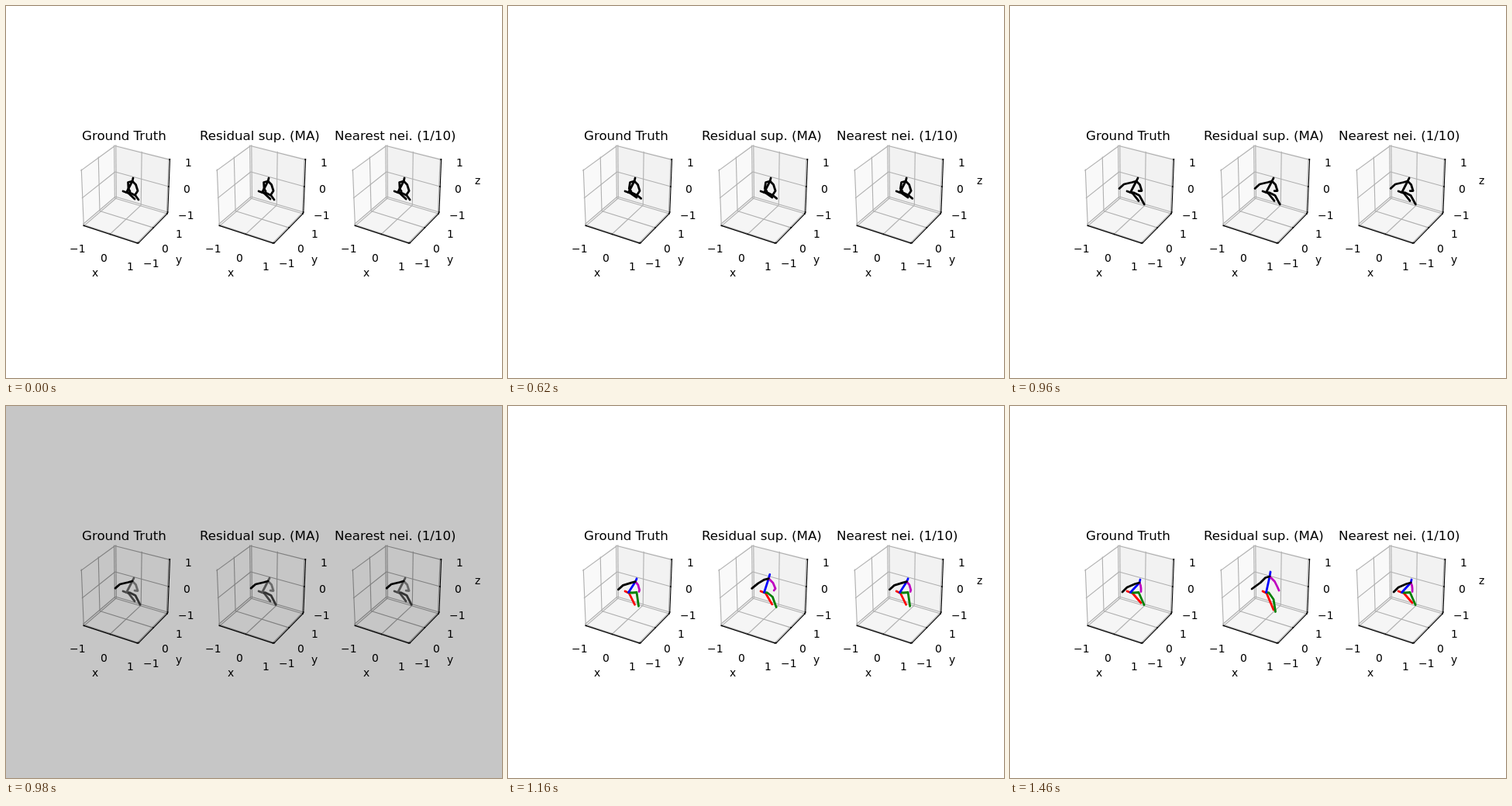
Recreate the animation shown at these times as an HTML page with a canvas. Size 640x480 px, loop 1480 ms.

```html
<!DOCTYPE html>
<html lang="en">
<head>
<meta charset="utf-8">
<title>Pose comparison</title>
<style>
  html, body { margin: 0; width: 100%; height: 100%; overflow: hidden; background: #fff; }
  canvas { display: block; }
</style>
</head>
<body>
<canvas id="stage" width="640" height="480"></canvas>
<script>
const ctx = document.getElementById('stage').getContext('2d');
const LOOP = 1480, STEP = 20, PITCH = 175.06;
const GREY_START = 980, COLOR_START = 1000;
const EDGE = 0.5 + 1 / 48;
const TICKS = [-0.5, 0, 0.5];
const TITLES = ['Ground Truth', 'Residual sup. (MA)', 'Nearest nei. (1/10)'];

const progress = (time, from, to) => Math.min(1, Math.max(0, (time - from) / (to - from)));
const smooth = u => u * u * (3 - 2 * u);
const easeOut = u => u * (2 - u);

// Perspective view of the unit cube, 30° up and 60° to the side.
function project(x, y, z) {
  const c = Math.sqrt(3) / 2;
  const depth = 10 - (c / 2 * x - 0.75 * y + z / 2);
  const scale = 788.54 / depth;
  return [154.91 + scale * (c * x + y / 2),
          240.43 - scale * (-x / 4 + c / 2 * y + c * z)];
}

function trace(points) {
  ctx.beginPath();
  points.forEach(p => ctx.lineTo(...p));
}

function line(points, color, width) {
  trace(points);
  ctx.strokeStyle = color;
  ctx.lineWidth = width;
  ctx.stroke();
}

const line3 = (a, b, color, width = 1.11) =>
  line([project(...a), project(...b)], color, width);

function pane(corners, color) {
  trace(corners.map(c => project(...c)));
  ctx.fillStyle = color;
  ctx.fill();
}

// Centred text, snapped to whole pixels on the stage.
function text(str, x, y, size = 13.89) {
  ctx.font = `${size}px "DejaVu Sans", sans-serif`;
  const shift = ctx.getTransform().e;
  const left = Math.round(x + shift - ctx.measureText(str).width / 2);
  ctx.fillText(str, left - shift, y);
}

function drawAxes(index, grey) {
  const e = EDGE, grid = grey ? '#808080' : '#b0b0b0';
  if (!grey) {
    pane([[-e,-e,-e], [-e,e,-e], [-e,e,e], [-e,-e,e]], '#f9f9f9');
    pane([[-e,e,-e], [e,e,-e], [e,e,e], [-e,e,e]], '#f2f2f2');
    pane([[-e,-e,-e], [e,-e,-e], [e,e,-e], [-e,e,-e]], '#f5f5f5');
  }
  ctx.lineCap = 'butt';
  for (const t of TICKS) {
    line3([t,-e,-e], [t,e,-e], grid);
    line3([t,e,-e], [t,e,e], grid);
    line3([-e,t,-e], [e,t,-e], grid);
    line3([-e,t,-e], [-e,t,e], grid);
    line3([-e,-e,t], [-e,e,t], grid);
    line3([-e,e,t], [e,e,t], grid);
  }
  line3([-e,-e,-e], [e,-e,-e], '#000');
  line3([e,-e,-e], [e,e,-e], '#000');
  line3([e,e,-e], [e,e,e], '#000');
  const out = e + 1 / 120, inner = e - 1 / 60;
  for (const t of TICKS) {
    line3([t,-out,-e], [t,-inner,-e], '#000', 1.6);
    line3([out,t,-e], [inner,t,-e], '#000', 1.6);
    line3([out,e,t], [inner,e,t], '#000', 1.6);
  }

  ctx.fillStyle = '#000';
  text(TITLES[index], 152.4, 173, 16.67);
  ['−1', '0', '1'].forEach((label, i) => {
    text(label, 92 + 34.2 * i, Math.round(318 + 11.5 * i));
    text(label, 187.4 + 18 * i, Math.round(336.8 - 19 * i));
    text(label, 231.8 + 1.8 * i, Math.round(275.4 - 34 * i));
  });
  text('x', 115, 349);
  text('y', 223, 332);
  if (index === 2) text('z', 259, 230);
}

// First the left arm swings out; then one figure rises while the others bow and step.
function drawFigure(time, rising, colors) {
  const settle = smooth(progress(time, 0, 420));
  const reach = smooth(progress(time, 560, 800));
  const swing = smooth(progress(time, 560, 960));
  const kick = smooth(progress(time, 800, 1000));
  const last = progress(time, COLOR_START, 1460);
  const rise = rising ? easeOut(last) : 0;
  const drop = rising ? last : 0;
  const bow = rising ? 0 : last;
  const lift = rising ? 0 : progress(time, COLOR_START, 1160);
  const step = Math.sin(Math.PI * bow);

  const hip = [151, 239], pelvis = [155.5, 240.5], rightHip = [160 - drop, 241];
  const neck = [163 + 4 * bow - 3 * rise, 226 + 2 * bow - 6 * rise];
  const near = (dx, dy) => [neck[0] + dx, neck[1] + dy];
  const head = near(1 + swing - bow - rise, -4 - 2 * rise);
  const shoulder = near(-5.5, 1.5);
  const leftElbow = [158 - 11 * reach + 4 * bow + rise, 236 - 6 * swing + 4 * bow - 2 * rise];
  const leftHand = [160 - 19 * swing + 4 * bow - 4 * drop, 239 - 4 * kick + 5 * bow + drop];
  const rightElbow = near(4.5 - 3 * bow + 2 * rise, 4.5 - bow + 2 * rise);
  const wrist = [170 - bow, 238.5 - 3 * bow - 5 * rise];
  const rightHand = [167 - kick + 3 * lift + 6 * drop, 243 - 5 * kick + 1.5 * lift];
  const leftKnee = [158 - 2 * step - 2 * drop, 241.5];
  const leftFoot = [166 + 3 * bow - 4 * step - drop,
                    249 - 2 * settle + 5 * kick + 2 * bow + 4 * step + 11 * drop];
  const rightKnee = [167 - lift - 2 * drop, 244.5 - 4 * lift + 5 * drop];
  const rightFoot = [171 + 4 * reach - 2 * kick - 5 * step - 5.5 * drop,
                     250 - 2 * settle + 2 * reach + 6.5 * kick + 2 * step + 9 * drop];

  ctx.lineCap = ctx.lineJoin = 'round';
  [
    [hip, leftKnee, leftFoot],
    [pelvis, rightHip, rightKnee, rightFoot],
    [pelvis, neck, head],
    [neck, rightElbow, wrist, rightHand],
    [neck, shoulder, leftElbow, leftHand]
  ].forEach((limb, i) => line(limb, colors[i], 2.78));
}

function draw(time) {
  const grey = time >= GREY_START && time < COLOR_START;
  const colors = grey ? ['#444', '#333', '#555', '#6a6a6a', '#000']
    : time >= COLOR_START ? ['#f00', '#008000', '#00f', '#bf00bf', '#000']
    : Array(5).fill('#000');
  ctx.fillStyle = grey ? '#c6c6c6' : '#fff';
  ctx.fillRect(0, 0, 640, 480);
  TITLES.forEach((_, i) => {
    ctx.save();
    ctx.translate(i * PITCH, 0);
    drawAxes(i, grey);
    drawFigure(time, i === 1, colors);
    ctx.restore();
  });
}

const start = performance.now();
function tick() {
  const time = (performance.now() - start) % LOOP;
  draw(Math.floor(time / STEP) * STEP);
  requestAnimationFrame(tick);
}
tick();
</script>
</body>
</html>
```
